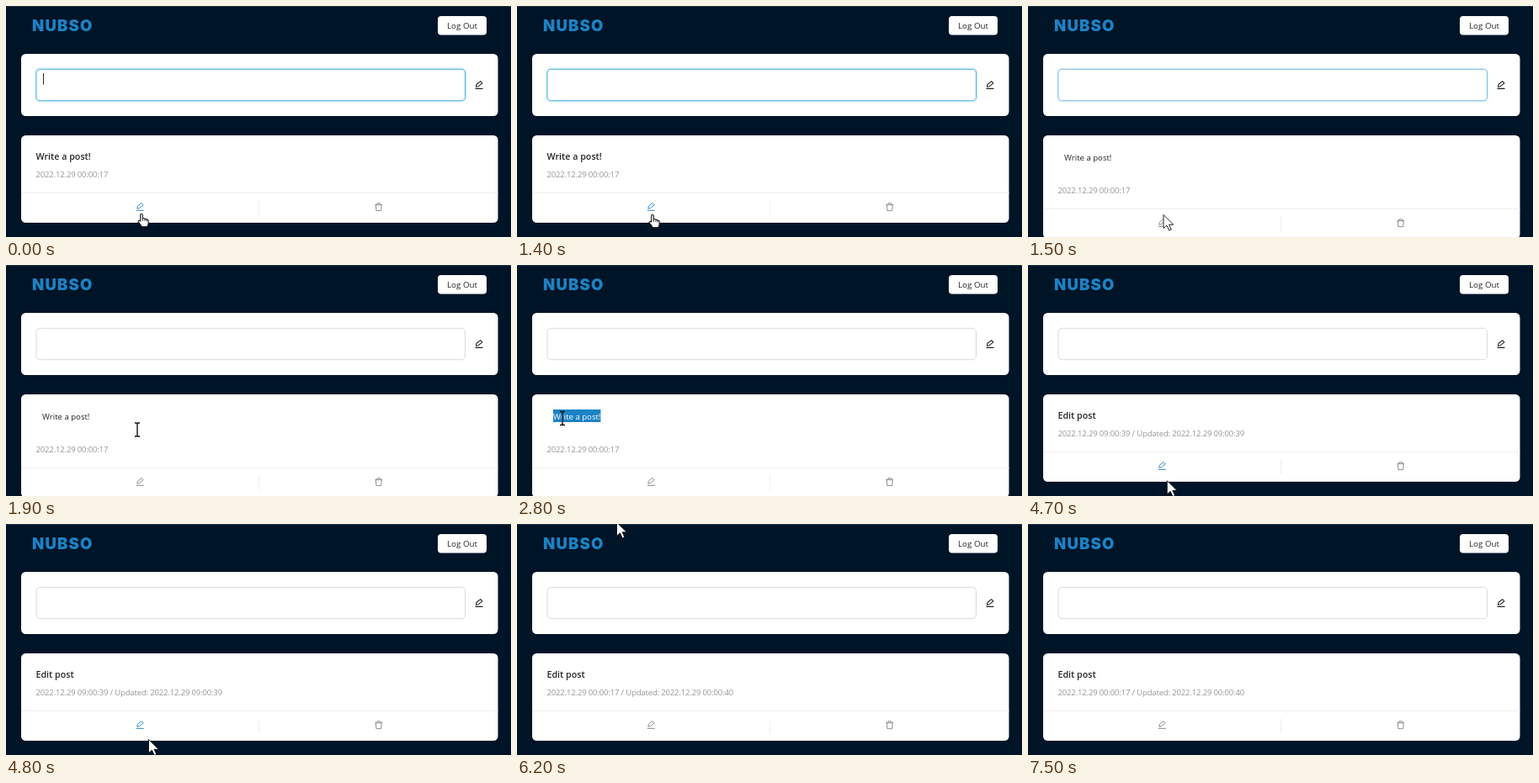
An HTML page for the animation above (7.6 s loop, 600 by 275 pixels).

```html
<!DOCTYPE html>
<html lang="en">
<head>
<meta charset="utf-8">
<title>Post editor</title>
<style>
  html, body { margin: 0; width: 100%; height: 100%; overflow: hidden; background: #001428; }
  svg { display: block; width: 600px; height: 275px; }
  text { font: 9.6px "Open Sans", "Noto Sans", sans-serif; fill: #262626; white-space: pre; }
  .brand { font: 900 18.5px Inter, sans-serif; letter-spacing: 1.2px; fill: #1c82c4; }
  .title { font-size: 10.7px; font-weight: 600; }
  .date { font-size: 9.5px; letter-spacing: -.15px; fill: #969696; }
  .card { fill: #fff; }
  .rule { stroke: #efefef; }
  .icon { fill: none; stroke: #808080; stroke-width: .9; stroke-linejoin: round; }
</style>
</head>
<body>
<svg viewBox="0 0 600 275">
  <defs>
    <path id="pencil" d="M-4.5 4.4H4.5M-3.5 2.2L-2.9-.7 1.7-4.4 3.9-2.2-.8 1.7Z"/>
    <path id="bin" d="M-4.4-2.6H4.4M-1.9-2.6V-4.4H1.9V-2.6M-3.4-2.6L-2.9 4.4H2.9L3.4-2.6"/>
  </defs>
  <rect width="600" height="1" fill="#17303f"/>
  <text class="brand" x="31" y="29.5">NUBSO</text>
  <rect x="513" y="12" width="58" height="22.5" rx="4" fill="#fff"/>
  <text x="542" y="26.5" text-anchor="middle" style="font-size:9.8px">Log Out</text>

  <rect class="card" x="18" y="57" width="566.5" height="74" rx="5.5"/>
  <rect id="glow" x="35" y="74.5" width="511.5" height="39" rx="5" fill="none" stroke="#d5eef9" stroke-width="2"/>
  <rect id="field" x="36" y="75.3" width="509.5" height="37.4" rx="4.5" fill="#fff"/>
  <path id="fieldCaret" d="M44.5 80V93.5" stroke="#222"/>
  <use href="#pencil" class="icon" x="562" y="94" style="stroke:#222;stroke-width:1.1"/>

  <rect id="card" class="card" x="18" y="154" width="566.5" rx="5.5"/>
  <text id="title" class="title" x="35.5" y="182.5"></text>
  <g id="editor">
    <rect id="selection" x="43" y="172" height="15" fill="#1c82c4"/>
    <text id="draft" x="43" y="183.5"></text>
    <path id="draftCaret" d="M.5 173V186.5" stroke="#111"/>
  </g>
  <g id="footer">
    <text id="date" class="date" x="35.5" y="203.7"></text>
    <path class="rule" d="M18 222.5H584.5M300.5 232V249"/>
    <use id="edit" href="#pencil" class="icon" x="159.3" y="239"/>
    <use href="#bin" class="icon" x="442.8" y="239.3"/>
  </g>

  <g id="hand" fill="#fff" stroke="#111" stroke-width="1.1" stroke-linejoin="round">
    <path d="M-1.3 8.5V1.2Q-1.3 0 0 0T1.3 1.2V5.5Q3.5 4.7 4 6.2 5.8 5.5 6.3 7 8.2 6.6 8.2 8.2V11Q8.2 13 6.8 15.3H.3Q-.8 13-3.8 9.8-4.3 8-2.8 8Z"/>
    <path d="M1.3 5.5V8.5M4 6.2V8.7M6.3 7V9" stroke-width=".8"/>
  </g>
  <path id="beam" d="M-3-8H-1L0-7 1-8H3M0-7V7M-3 8H-1L0 7 1 8H3" fill="none" stroke="#111" stroke-width="1.4"/>
  <path id="arrow" d="M0 0V16.2L3.9 12.7 6.7 18.8 9.3 17.6 6.6 11.8H11.8Z" fill="#fff" stroke="#111" stroke-width=".9"/>
</svg>
<script>
const LOOP = 7600, STEP = 100;
const $ = id => document.getElementById(id);
const show = (id, on) => $(id).setAttribute('visibility', on ? 'visible' : 'hidden');
const move = (id, x, y) => $(id).setAttribute('transform', `translate(${x} ${y})`);
const clamp = v => Math.max(0, Math.min(1, v));
const within = (t, a, b) => t >= a && t < b;

// Pointer path: time, x, y
const path = [
  [0, 161, 247.5], [1200, 161, 247.5], [1300, 161, 248.5], [1500, 161, 248.5],
  [1900, 156, 196], [2000, 165, 206], [2200, 101, 181], [2400, 33, 181], [2600, 46, 180],
  [4200, 110, 200], [4400, 161, 257], [4600, 161, 257], [4800, 169.5, 256.5],
  [5100, 169.5, 256.5], [5500, 177, 163], [6100, 177, 163], [6200, 118.5, -2]
];
const shapes = [
  [0, 'hand'], [1500, 'arrow'], [1700, 'beam'], [3000, ''], [4300, 'arrow'],
  [4400, 'hand'], [4700, 'arrow'], [6300, '']
];
const keyTimes = [3000, 3100, 3200, 3400, 3600, 3700, 3800, 3800, 3900];
const oldText = 'Write a post!', newText = 'Edit post';

function pointerAt(t) {
  const i = path.findIndex(p => p[0] > t);
  if (i < 0) return path[path.length - 1].slice(1);
  const [t0, x0, y0] = path[i - 1], [t1, x1, y1] = path[i];
  const k = (t - t0) / (t1 - t0);
  return [x0 + (x1 - x0) * k, y0 + (y1 - y0) * k];
}

function draw(t) {
  const editing = within(t, 1500, 4600), saved = t >= 4600;
  const [px, py] = pointerAt(t);

  // New-post field loses its focus ring when the edit icon is pressed
  const focus = 1 - clamp((t - 1400) / 300);
  $('field').setAttribute('stroke', `rgb(${217 - 142 * focus},${217 - 40 * focus},${217 + 4 * focus})`);
  $('glow').setAttribute('opacity', focus);
  show('fieldCaret', t < 700 || within(t, 1200, 1300));

  $('card').setAttribute('height', editing ? 123 : 104);
  move('footer', 0, editing ? 19 : 0);
  show('title', !editing);
  $('title').textContent = saved ? newText : oldText;
  const stamp = '2022.12.29 ';
  $('date').textContent = !saved ? stamp + '00:00:17'
    : t < 5000 ? `${stamp}09:00:39 / Updated: ${stamp}09:00:39`
    : `${stamp}00:00:17 / Updated: ${stamp}00:00:40`;
  const hover = t < 1500 || within(t, 4400, 5200);
  $('edit').style.stroke = hover ? '#1c82c4' : '';

  const typing = t >= 3000;
  const draft = $('draft');
  draft.textContent = typing ? newText.slice(0, keyTimes.filter(k => k <= t).length) : oldText;
  draft.setAttribute('visibility', editing ? 'visible' : 'hidden');
  const width = draft.getComputedTextLength();
  const selecting = within(t, 2200, 3000);
  const start = t < 2400 ? Math.max(43, Math.min(px, 43 + width)) : 43;
  show('selection', selecting);
  $('selection').setAttribute('x', start);
  $('selection').setAttribute('width', 43 + width - start);
  draft.style.fill = selecting && start === 43 ? '#fff' : '';
  show('draftCaret', editing && typing && t < 4400);
  move('draftCaret', Math.round(43 + width) - 1, 0);

  const shape = shapes.filter(s => s[0] <= t).pop()[1];
  for (const id of ['hand', 'beam', 'arrow']) {
    show(id, id === shape);
    move(id, px, py);
  }
}

function tick() {
  draw(Math.floor(performance.now() % LOOP / STEP) * STEP);
  requestAnimationFrame(tick);
}
tick();
</script>
</body>
</html>
```
